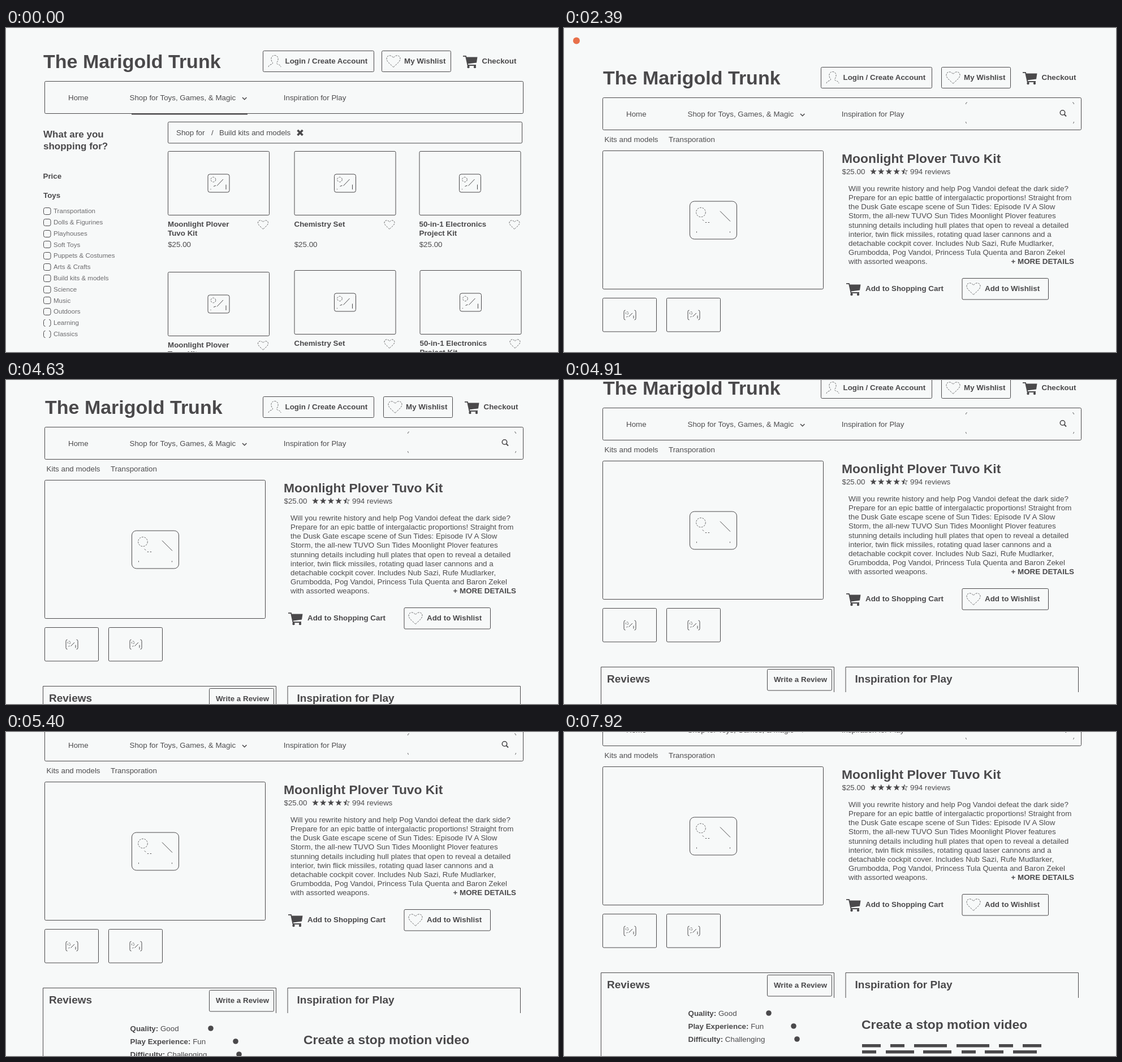
These frames come from a looping animation (976x574 px, 7.99 s). An HTML page:

```html
<!DOCTYPE html>
<html lang="en">
<head>
<meta charset="utf-8">
<title>Toy shop wireframe</title>
<style>
  html, body { margin: 0; width: 100%; height: 100%; overflow: hidden; background: #f7f9f9; }
  svg { display: block; }
  text { font: 13.36px "Liberation Sans", Arial, sans-serif; fill: #4e4d4f; }
  .b { font-weight: 700; fill: #4a494b; }
  .logo { font-size: 34px; }
  .h1 { font-size: 22.85px; }
  .h2 { font-size: 19px; }
  .h3 { font-size: 17px; }
  .thin { font-size: 11.55px; fill: #6c6b6e; }
  .line { fill: none; stroke: #4a494b; stroke-width: 1; vector-effect: non-scaling-stroke; }
  .faint { stroke-width: .8; stroke-dasharray: 3 1.6; }
  .solid { fill: #4a494b; }
</style>
</head>
<body>
<svg width="976" height="574" viewBox="0 0 976 574">
  <defs>
    <path id="heart" class="line faint" d="M0 10.5C-4 6-12 1-12-4.5C-12-11.5-3-12 0-6C3-12 12-11.5 12-4.5C12 1 4 6 0 10.5Z"/>
    <path id="person" class="line faint" d="M-11 10.5C-10 5-3 7-3.5 3C-8-2-6.500-10 0-10C6.500-10 8-2 3.500 3C3 7 10 5 11 10.500"/>
    <g id="cart">
      <path class="solid" d="M5.500 3.500H25.500L24 13.500L8 15.500Z"/>
      <path d="M0 1.800H5L8.500 18H23" fill="none" stroke="#4a494b" stroke-width="1.800"/>
      <circle class="solid" cx="9.500" cy="21" r="2.200"/>
      <circle class="solid" cx="21" cy="21" r="2.200"/>
    </g>
    <g id="image">
      <rect class="line" x="-19" y="-16" width="38" height="32" rx="3.500"/>
      <circle class="line faint" cx="-9.500" cy="-6.500" r="4.300"/>
      <path class="line" d="M-3 4.500L8-7M-9 5.500L-5 4M13 2.500V11M-14 10v1"/>
    </g>
    <g id="hero">
      <rect class="line" x="-41.500" y="-33.500" width="83" height="67" rx="8"/>
      <circle class="line faint" cx="-22" cy="-14" r="8.300"/>
      <path class="line" d="M12-16L30 2M-19-1l2 2M-14 4h2M-9 4h2M-29.500 20v2M29.500 20v2"/>
    </g>
    <g id="thumb">
      <path class="line" d="M-8-8.500Q-10.500-8.500-10.500-6V6Q-10.500 8.500-8 8.500M8-8.500Q10.500-8.500 10.500-6V6Q10.500 8.500 8 8.500"/>
      <circle class="line faint" cx="-5" cy="-3.500" r="2.300"/>
      <path class="line" d="M-2 3L4.500-3.500M-6 3.500l2-1M6.500 1V6"/>
    </g>
    <path id="star" class="solid" d="M0-6L1.500-1.900 5.800-1.900 2.400.800 3.600 5 0 2.500-3.600 5-2.400.800-5.800-1.900-1.500-1.900Z"/>
  </defs>
  <g id="list"></g>
  <g id="product"></g>
</svg>
<script>
const $ = id => document.getElementById(id);
const text = (x, y, s, cls = '') => `<text x="${x}" y="${y}" class="${cls}">${s}</text>`;
const bold = (x, y, s, cls = '') => text(x, y, s, 'b ' + cls);
const box = (x, y, w, h, r = 2) =>
  `<rect class="line" x="${x}" y="${y}" width="${w}" height="${h}" rx="${r}"/>`;
const path = (d, width = 1) => `<path class="line" d="${d}" style="stroke-width:${width}"/>`;
const use = (id, x, y, k = 1) => `<use href="#${id}" transform="translate(${x} ${y}) scale(${k})"/>`;
const dot = (x, y, r = 4.8) => `<circle class="solid" cx="${x}" cy="${y}" r="${r}"/>`;

const header = (dx, dy) => `<g transform="translate(0 ${dy})">
  ${bold(66 + dx, 70.5, 'The Marigold Trunk', 'logo')}
  ${box(454.5, 40.5, 196, 37)}${use('person', 475, 58.5)}${bold(493.5, 63, 'Login / Create Account')}
  <g transform="translate(${dx} 0)">
    ${box(664.5, 40.5, 122, 37)}${use('heart', 685, 59)}${bold(704, 63, 'My Wishlist')}
    ${use('cart', 808, 48)}${bold(841.5, 63, 'Checkout')}
  </g>
  ${box(68.5, 94.5, 846, 57)}
  ${text(110, 128, 'Home')}
  ${text(218.5, 128, 'Shop for Toys, Games, &amp; Magic')}${path('M418 123l3.7 3.700 3.700-3.700', 1.6)}
  ${text(490.8, 128, 'Inspiration for Play')}
</g>`;

const KIT = 'Moonlight Plover';

function card(x, y, name, second, priced) {
  return box(x, y, 179, 113) + use('image', x + 89.5, y + 56.5) +
    bold(x - .5, y + 133.5, name) + bold(x - .5, y + 149.5, second) +
    use('heart', x + 168, y + 130, .75) +
    (priced ? text(x - .3, y + 169.7, '$25.00') : '');
}

function shelf(ys, third, priced) {
  return card(286.5, ys[0], KIT, 'Tuvo Kit', priced) +
    card(510, ys[1], 'Chemistry Set', '', priced) +
    card(third, ys[1], '50-in-1 Electronics', 'Project Kit', priced);
}

const toys = ['Transportation', 'Dolls &amp; Figurines', 'Playhouses', 'Soft Toys',
  'Puppets &amp; Costumes', 'Arts &amp; Crafts', 'Build kits &amp; models', 'Science',
  'Music', 'Outdoors', 'Learning', 'Classics'];

const checkbox = (y, open) => open
  ? path(`M69.5 ${y - 6}q-3 0-3 3v6q0 3 3 3M76 ${y - 6}q3 0 3 3v6q0 3-3 3`)
  : box(66.5, y - 6, 12.5, 12, 3);

$('list').innerHTML = header(0, 0) + path('M222 152.500H427', 2) +
  bold(66, 194, 'What are you', 'h3') + bold(66, 215, 'shopping for?', 'h3') +
  bold(65.5, 266.5, 'Price') + bold(66, 301, 'Toys') +
  toys.map((toy, i) => {
    const y = 324 + 19.8 * i;
    return checkbox(Math.round(y) + .5, i > 9) + text(84, y + 4.2, toy, 'thin');
  }).join('') +
  box(286.5, 166.5, 626, 37.5) + text(301, 190, 'Shop for') + text(363, 190, '/') +
  text(377, 190, 'Build kits and models') + path('M515.500 181l9 9m0-9l-9 9', 3.6) +
  shelf([218.5, 218.5], 731, true) + shelf([432.5, 429.5], 732, false);

const story = [
  'Will you rewrite history and help Pog Vandoi defeat the dark side?',
  'Prepare for an epic battle of intergalactic proportions! Straight from',
  'the Dusk Gate escape scene of Sun Tides: Episode IV A Slow',
  'Storm, the all-new TUVO Sun Tides ' + KIT + ' features',
  'stunning details including hull plates that open to reveal a detailed',
  'interior, twin flick missiles, rotating quad laser cannons and a',
  'detachable cockpit cover. Includes Nub Sazi, Rufe Mudlarker,',
  'Grumbodda, Pog Vandoi, Princess Tula Quenta and Baron Zekel',
  'with assorted weapons.'];

const stars = [0, 1, 2, 3].map(i => use('star', 547 + 13.7 * i, 254.5)).join('') +
  `<path class="solid" d="M601.800 248.500V257L598.200 259.500 599.400 255.300 596 252.600 600.300 252.600Z"/>` +
  path('M602 249l1.300 3.600h4l-3.200 2.700 1.200 4-3.300-2.300', .8);

const rating = (y, label, value, x) => dot(x, y) +
  `<text x="219.500" y="${y + 4.7}"><tspan class="b">${label}:</tspan> ${value}</text>`;

const bars = (y, runs) => runs.map(([x, w]) =>
  `<rect class="solid" x="${x}" y="${y}" width="${w}" height="5.500"/>`).join('');

$('product').innerHTML = '<circle cx="22" cy="22.500" r="6" fill="#e8704b"/>' + header(3, 29) +
  path('M713 132h-1q-1.500 0-1.500 3M710.500 166q0 3 1.500 3M899 132h1q1.500 0 1.500 3M901.500 166q0 3-1.500 3', .8) +
  `<circle class="line" cx="881.500" cy="150" r="4.200" style="stroke-width:1.600"/>` + path('M884.500 153l3.500 3.500', 2) +
  text(71.5, 202, 'Kits and models') + text(185, 202, 'Transporation') +
  box(68.5, 217.5, 390, 245) + use('hero', 264, 340.5) +
  [68.5, 181.5].map(x => box(x, 478.5, 95, 59.5) + use('thumb', x + 48, 508.5)).join('') +
  bold(491, 239, KIT + ' Tuvo Kit', 'h1') +
  text(491.5, 259, '$25.00') + stars + text(612, 259, '994 reviews') +
  story.map((s, i) => text(503, 288.8 + 16.2 * i, s)).join('') +
  bold(790.5, 418.3, '+ MORE DETAILS') +
  use('cart', 499, 451) + bold(533, 466.3, 'Add to Shopping Cart') +
  box(704, 443.5, 152.5, 37.5) + use('heart', 724, 462) + bold(744, 466.3, 'Add to Wishlist') +
  path('M65.500 900V582.500H477.500V627M498 627V582.500H909.500V627') +
  bold(76, 610.3, 'Reviews', 'h2') +
  box(359.5, 586.5, 114, 37.5) + bold(371, 608.7, 'Write a Review') +
  bold(514.5, 610.3, 'Inspiration for Play', 'h2') +
  rating(654, 'Quality', 'Good', 362) +
  rating(677, 'Play Experience', 'Fun', 406) +
  rating(700, 'Difficulty', 'Challenging', 412) +
  bold(526, 682, 'Create a stop motion video', 'h1') +
  bars(709, [[527, 33], [577, 25], [619, 58], [694, 58], [769, 25], [811, 33]]) +
  bars(720, [[527, 25], [569, 50], [635, 50], [703, 25], [744, 33], [794, 42]]);

// Scroll position by 70 ms tick, linear between the points.
const LOOP = 7990, TICK = 70, CUT = 2390;
const first = [[0, 0], [1, 1], [2, 4], [3, 9], [7, 40], [11, 74], [16, 116], [17, 123], [18, 129]];
const second = [[0, 129], [1, 133], [4, 156]];

function along(points, n) {
  if (n <= 0) return points[0][1];
  for (let i = 1; i < points.length; i++) {
    const [a, p] = points[i - 1], [b, q] = points[i];
    if (n <= b) return Math.round(p + (q - p) * (n - a) / (b - a));
  }
  return points[points.length - 1][1];
}

const ticks = (t, start) => Math.floor((t - start) / TICK) + 1;
const scrollAt = t => t < 7710 ? along(first, ticks(t, 4210)) : along(second, ticks(t, 7710));

function draw(now) {
  const t = now % LOOP, detail = t >= CUT;
  $('list').style.display = detail ? 'none' : '';
  $('product').style.display = detail ? '' : 'none';
  $('product').setAttribute('transform', `translate(0 ${-scrollAt(t)})`);
}

let start;
function loop(now) {
  start ??= now;
  draw(now - start);
  requestAnimationFrame(loop);
}
draw(0);
requestAnimationFrame(loop);
</script>
</body>
</html>
```
